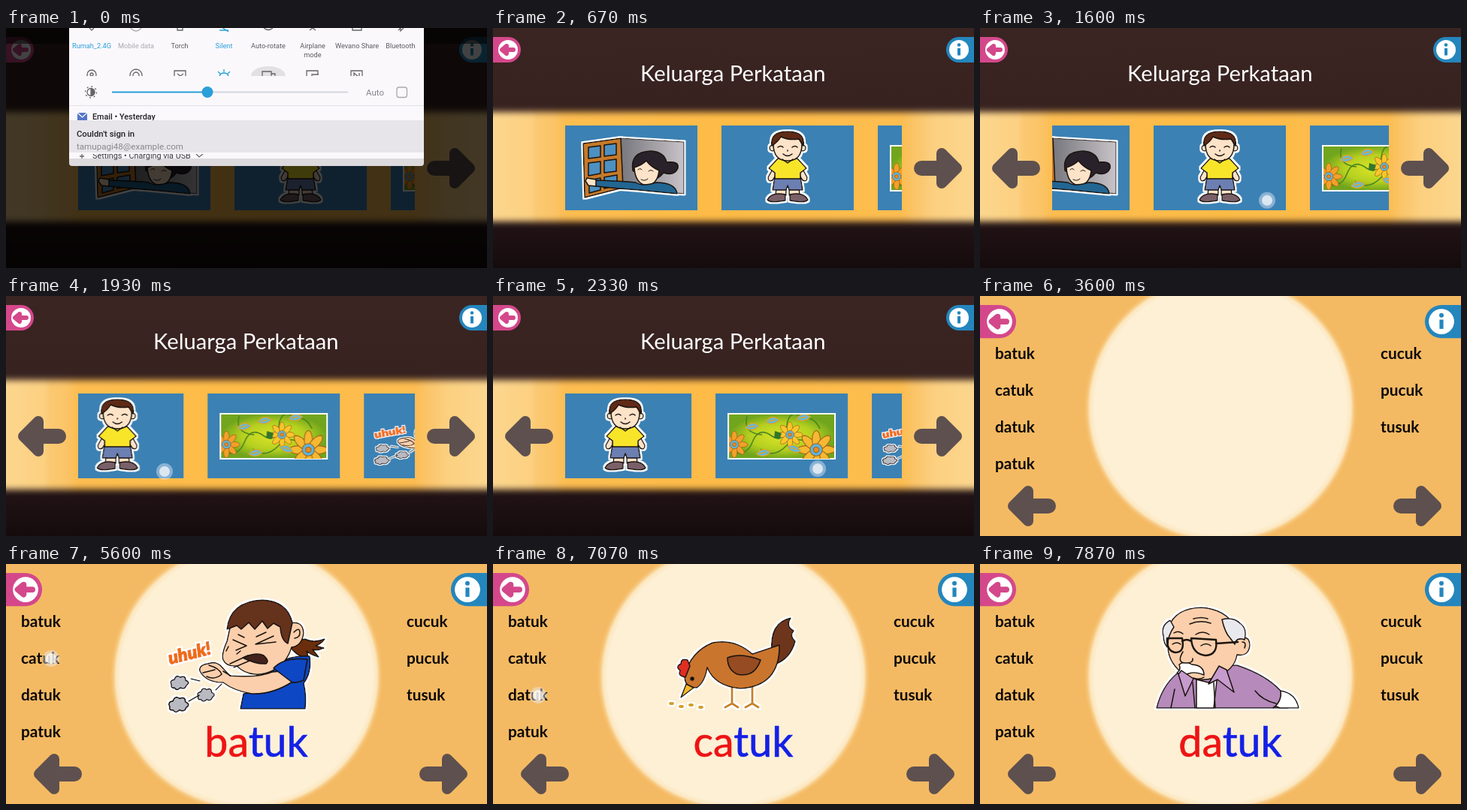
An HTML page for the animation above (8 s loop, 640 px wide and 320 px high).

```html
<!DOCTYPE html>
<html lang="ms">
<head>
<meta charset="utf-8">
<title>Keluarga Perkataan</title>
<style>
html, body { margin: 0; width: 100%; height: 100%; overflow: hidden; background: #1a0e0f; }
svg.stage { display: block; width: 100%; height: 100%; }
.title, .word, .list { font-family: Lato, sans-serif; }
.title { font-size: 29.2px; fill: #fff; }
.list { font-size: 20.8px; font-weight: 700; fill: #0b0808; }
.word { font-size: 55.5px; text-anchor: middle; fill: #1420e6; stroke: #1420e6; stroke-width: .6; }
.word .onset { fill: #ee1414; stroke: #ee1414; }
.ui { font-family: Roboto, sans-serif; }
.tiles { font-size: 9.2px; text-anchor: middle; fill: #5a5a5e; }
.on { fill: #2a9fd8; }
.off { fill: #aaa9ae; }
.line { fill: none; stroke: #666; stroke-width: 1.3; }
.ink { stroke: #1a1210; stroke-width: 1.5; stroke-linejoin: round; stroke-linecap: round; }
.bare { fill: none; }
.skin { fill: #fccfac; }
.pale { fill: #fde3c8; }
.arrow { fill: #5e504f; stroke: #5e504f; stroke-linejoin: round; stroke-linecap: round; }

/* 1% of the loop is 80 ms */
.anim { animation: 8s linear infinite both; }
.shade { animation-name: shade; }
.dim { animation-name: dim; }
.strip { animation-name: strip; }
.prev { animation-name: prev; }
.detail { animation-name: detail; }
.cough { animation-name: cough; }
.peck { animation-name: peck; }
.elder { animation-name: elder; }
.drag1 { animation-name: drag1; }
.drag2 { animation-name: drag2; }
.tap1 { animation-name: tap1; }
.tap2 { animation-name: tap2; }
.tap3 { animation-name: tap3; }
.tap4 { animation-name: tap4; }
@keyframes shade {
  0%, .875% { transform: none; animation-timing-function: ease-out; }
  6.5%, 100% { transform: translateY(-192px); }
}
@keyframes dim { 0%, .875% { opacity: 1; } 8.3%, 100% { opacity: 0; } }
@keyframes strip {
  0%, 17.5% { transform: none; animation-timing-function: ease-in-out; }
  24.125% { transform: translateX(-244px); animation-timing-function: ease-out; }
  27.5%, 28.4% { transform: translateX(-208px); animation-timing-function: ease-in; }
  32% { transform: translateX(-330px); animation-timing-function: ease-out; }
  35.875% { transform: translateX(-406px); animation-timing-function: ease-out; }
  38.3%, 100% { transform: translateX(-416px); }
}
@keyframes prev { 0%, 18.5% { opacity: 0; } 20%, 100% { opacity: 1; } }
@keyframes detail { 0%, 40.6% { opacity: 0; } 45%, 100% { opacity: 1; } }
@keyframes cough { 0%, 53% { opacity: 0; } 58.3%, 72% { opacity: 1; } 77.4%, 100% { opacity: 0; } }
@keyframes peck { 0%, 72% { opacity: 0; } 77.4%, 91% { opacity: 1; } 96.5%, 100% { opacity: 0; } }
@keyframes elder { 0%, 91% { opacity: 0; } 96.5%, 100% { opacity: 1; } }
@keyframes drag1 {
  0%, 17.45% { opacity: 0; transform: translate(455px, 228px); }
  17.5% { opacity: 1; transform: translate(455px, 228px); animation-timing-function: ease-in-out; }
  24.125% { opacity: 1; transform: translate(211px, 234px); }
  26%, 100% { opacity: 0; transform: translate(211px, 234px); }
}
@keyframes drag2 {
  0%, 28.35% { opacity: 0; transform: translate(440px, 230px); }
  28.4% { opacity: 1; transform: translate(440px, 230px); animation-timing-function: ease-in; }
  32% { opacity: 1; transform: translate(318px, 234px); }
  34.5%, 100% { opacity: 0; transform: translate(270px, 234px); }
}
@keyframes tap1 { 0%, 39.1% { opacity: 0; } 39.15%, 40.5% { opacity: 1; } 42.5%, 100% { opacity: 0; } }
@keyframes tap2 { 0%, 50.8% { opacity: 0; } 50.85%, 52% { opacity: 1; } 54%, 100% { opacity: 0; } }
@keyframes tap3 { 0%, 69.95% { opacity: 0; } 70%, 71% { opacity: 1; } 73%, 100% { opacity: 0; } }
@keyframes tap4 { 0%, 88.3% { opacity: 0; } 88.35%, 90% { opacity: 1; } 92%, 100% { opacity: 0; } }
</style>
</head>
<body>
<svg class="stage" viewBox="0 0 640 320" preserveAspectRatio="none">
<defs>
  <linearGradient id="night" x2="0" y2="1">
    <stop stop-color="#3a2523"/><stop offset=".35" stop-color="#372220"/>
    <stop offset=".8" stop-color="#231416"/><stop offset="1" stop-color="#150b0d"/>
  </linearGradient>
  <linearGradient id="gold">
    <stop stop-color="#fcd68e"/><stop offset=".08" stop-color="#fcd081"/>
    <stop offset=".09" stop-color="#fbc972"/><stop offset=".125" stop-color="#fbc468"/>
    <stop offset=".15" stop-color="#fdbd51"/><stop offset=".5" stop-color="#febb45"/>
    <stop offset=".85" stop-color="#fdbd51"/><stop offset=".875" stop-color="#fbc468"/>
    <stop offset=".92" stop-color="#fcd081"/><stop offset="1" stop-color="#fcd68e"/>
  </linearGradient>
  <radialGradient id="moon">
    <stop offset=".92" stop-color="#fdf0d5"/><stop offset=".955" stop-color="#fce6bd"/>
    <stop offset="1" stop-color="#f6bd67" stop-opacity="0"/>
  </radialGradient>
  <radialGradient id="lime">
    <stop stop-color="#dde428"/><stop offset=".6" stop-color="#b5d020"/><stop offset="1" stop-color="#71a51d"/>
  </radialGradient>
  <linearGradient id="wall"><stop stop-color="#77777d"/><stop offset="1" stop-color="#c8c3c8"/></linearGradient>
  <filter id="soft" x="-5%" y="-15%" width="110%" height="130%"><feGaussianBlur stdDeviation="0 4"/></filter>
  <filter id="sticker" x="-10%" y="-10%" width="120%" height="120%">
    <feMorphology in="SourceAlpha" operator="dilate" radius="2" result="fat"/>
    <feFlood flood-color="#fff"/><feComposite in2="fat" operator="in"/>
    <feMerge><feMergeNode/><feMergeNode in="SourceGraphic"/></feMerge>
  </filter>
  <clipPath id="window"><path d="M96 130h448v113H96z"/></clipPath>
  <clipPath id="cloth"><path d="M18 158h140v59H18z"/></clipPath>
  <clipPath id="tileArea"><path d="M84 0h472v64H84z"/></clipPath>

  <g id="next" class="arrow">
    <path d="M-22 0H4" stroke-width="20"/>
    <path d="M5 -20L25 0 5 20z" stroke-width="14"/>
  </g>
  <g id="touch">
    <circle r="11" fill="#e8eefa" opacity=".45"/>
    <circle r="7" fill="#fff" opacity=".7"/>
  </g>
  <g id="back">
    <path d="M0 0H20a17 17 0 0 1 0 34H0z" fill="#d4488b"/>
    <circle cx="20" cy="17" r="13" fill="#fff"/>
    <path d="M18 12L12 17l6 5zM17 17h10" fill="#d4488b" stroke="#d4488b" stroke-width="6" stroke-linejoin="round" stroke-linecap="round"/>
  </g>
  <g id="info">
    <path d="M0 0H-20a17 17 0 0 0 0 34H0z" fill="#2486bd"/>
    <circle cx="-20" cy="17" r="13" fill="#fff"/>
    <circle cx="-20" cy="10.5" r="2.3" fill="#2486bd"/>
    <path d="M-20 15v9.500" stroke="#2486bd" stroke-width="4"/>
  </g>
  <path id="card" d="M0 130h176v113H0z" fill="#3b81b4"/>
  <g id="petals"><ellipse cx="9" rx="8" ry="3.6"/><ellipse cx="-9" rx="8" ry="3.6"/></g>
  <g id="bloom" stroke="#a0641a" stroke-width=".7">
    <use href="#petals"/><use href="#petals" transform="rotate(45)"/>
    <use href="#petals" transform="rotate(90)"/><use href="#petals" transform="rotate(135)"/>
    <circle r="5.5" fill="#5fb4dc"/><circle r="2.4" fill="#ef8a1d"/>
  </g>
  <path id="leaf" d="M0 0Q7 -11 18 -3Q10 6 0 0zM4 -1L13 -3" fill="#62b9dd" stroke="#e2a522" stroke-width="1.3"/>
  <path id="puff" class="ink" d="M-12 3q-3 -6 4 -7q2 -7 8 -3q7 -3 7 4q7 3 1 7q-2 6 -8 3q-5 5 -8 0q-5 1 -4 -4z" fill="#b9b9c2"/>

  <g id="coughArt" filter="url(#sticker)">
    <path class="ink" d="M374 92q10 12 24 8q11 6 26 0q-5 7 -12 9l11 3q-9 4 -15 2l8 10q-11 -3 -16 -8l3 11q-16 -3 -27 -19z" fill="#6b2e10"/>
    <path class="ink" d="M312 193l4 -20q20 -2 40 -13l-5 -19q20 -20 53 -18q3 22 -8 36q4 16 2 34z" fill="#0d46c4"/>
    <path class="ink skin" d="M300 77q-3 12 -6 26q-8 18 -5 25q4 9 18 8q10 10 24 11q13 1 24 -5q19 -10 25 -31q14 -2 16 -19q-1 -17 -18 -13l-18 -11z"/>
    <path class="ink" d="M294 87q4 -37 47 -39q33 1 40 30l-6 28q-9 -4 -10 -22l-9 -5l-8 7l-7 -10l-10 11l-8 -9l-10 9l-6 -5z" fill="#65301c"/>
    <path class="ink bare" d="M383 91q8 -8 8 1q0 6 -7 7"/>
    <path class="ink bare" d="M302 101l18 8l-14 6M356 96l-24 11l27 -3M309 94l8 4M333 97l13 -6M312 116l-5 4M296 110l-3 6" stroke-width="1"/>
    <path class="ink" d="M315 125q18 -8 28 -3q8 7 3 11q-13 1 -31 -8z" fill="#43201c"/>
    <path class="ink skin" d="M258 143q-2 -8 10 -10q10 -4 17 2l13 14q37 3 56 -5l23 -2l4 15q-26 17 -54 16q-24 -4 -38 -15q-23 0 -31 -15z"/>
    <path class="ink" d="M356 139l25 19q9 0 15 -3l5 -28q-32 -3 -45 12z" fill="#0d46c4"/>
    <path class="ink bare" d="M270 135q14 4 17 12q-9 8 -20 3M262 145l16 -4M289 143l10 6M298 133l24 -11M303 138l21 -9"/>
    <use href="#puff" x="232" y="158"/><use href="#puff" transform="translate(231 187) scale(1.1)"/><use href="#puff" transform="translate(267 174) scale(.95)"/>
    <path class="ink bare" d="M246 153l12 3M243 183l14 -8M279 168l8 -8"/>
    <text transform="translate(218 134) rotate(-14)" font-family="Lato, sans-serif" font-size="23.5" font-weight="900" font-style="italic" fill="#f06c10" stroke="#f06c10" stroke-width="1">uhuk!</text>
  </g>
</defs>

<g>
  <path d="M0 0h640v320H0z" fill="url(#night)"/>
  <path d="M0 112h640v146H0z" fill="url(#gold)" filter="url(#soft)"/>
  <text class="title" x="196" y="71">Keluarga Perkataan</text>
  <use href="#back" y="12"/><use href="#info" x="640" y="12"/>

  <g clip-path="url(#window)"><g class="anim strip">
    <g transform="translate(96)">
      <use href="#card"/>
      <g class="ink" filter="url(#sticker)">
        <path d="M74 147l84 5v69l-81 -8z" fill="url(#wall)" stroke-width="1"/>
        <path d="M24 154l50 -7l3 66l-51 13z" fill="#c57a2a"/>
        <path d="M31 159l16 -2v15l-16 2zM52 156l16 -2v15l-16 2zM31 180l16 -2v16l-16 3zM52 177l16 -2v16l-16 2zM32 203l15 -3v16l-15 4zM52 199l17 -3v14l-17 4z" fill="#4e90c2"/>
        <path d="M90 190q-4 -25 24 -26q18 1 21 15q17 -2 15 8q-5 11 -19 6q-9 11 -21 10z" fill="#292429"/>
        <path class="pale" d="M92 186q10 -3 16 -9q7 9 17 13q-2 19 -17 20q-15 -3 -16 -24z"/>
        <path d="M94 206q9 6 27 0q26 0 28 15l-52 -5q-28 -2 -56 -5l-1 -8q36 1 54 3z" fill="#216692"/>
        <path class="pale" d="M41 202l-12 -2l-2 4l4 6l10 1z"/>
        <path class="bare" d="M97 189q3 -3 5 0M111 191q3 -3 6 0M101 202q5 3 9 -1" stroke-width="1"/>
      </g>
    </g>
    <g transform="translate(304)">
      <use href="#card"/>
      <g class="ink" filter="url(#sticker)" stroke-width="1">
        <path class="pale" d="M72 181l-10 18q0 7 6 4l8 -12zM104 181l10 18q0 7 -6 4l-8 -12zM73 211h13v12H72zM90 211h13l1 12H90z"/>
        <path d="M61 229q5 -11 24 -7v8q-21 4 -24 -1zM115 229q-5 -11 -24 -7v8q21 4 24 -1z" fill="#7a6068"/>
        <path d="M71 198h34l3 18H90l-2 -6l-2 6H68z" fill="#6c7fb2"/>
        <path d="M75 174h26l12 13l-8 6v8H71v-8l-8 -6z" fill="#f8e52a"/>
        <circle class="pale" cx="68" cy="160" r="4"/><circle class="pale" cx="108" cy="160" r="4"/>
        <path class="pale" d="M69 155q0 22 19 22t19 -22q-4 -13 -19 -13t-19 13z"/>
        <path d="M67 157q-3 -19 21 -19t21 19l-6 -9q-14 2 -24 -3q-4 7 -12 12z" fill="#5e2b14"/>
        <path class="bare" d="M75 159q4 -3 7 0M94 159q4 -3 7 0M82 168q6 5 12 0M88 163v1M81 175l7 5l7 -5"/>
      </g>
    </g>
    <g transform="translate(512)">
      <use href="#card"/>
      <path d="M17 157h142v60H17z" fill="url(#lime)" stroke="#fff" stroke-width="2"/>
      <g clip-path="url(#cloth)">
        <path d="M18 207q23 9 31 -12t25 -9t21 -14t26 -6M60 204q17 14 35 -5t40 10M42 160q-6 23 20 25M113 164q17 -6 26 13" class="bare" stroke="#4d861e" stroke-width="1.6"/>
        <use href="#bloom" transform="translate(25 198) scale(1.05)" fill="#f3a02a"/>
        <use href="#bloom" transform="translate(99 185)" fill="#f9c62c"/>
        <use href="#bloom" transform="translate(134 205) scale(1.5)" fill="#f6b832"/>
        <use href="#leaf" x="40" y="176"/><use href="#leaf" x="67" y="168"/><use href="#leaf" x="55" y="211"/>
        <use href="#leaf" x="108" y="164"/><use href="#leaf" transform="translate(96 201) rotate(30)"/>
        <path d="M79 180l9 3l-3 8l-7 -2z" fill="#34762b"/>
      </g>
    </g>
    <g transform="translate(720)">
      <use href="#card"/>
      <use href="#coughArt" transform="matrix(.7476 0 0 .55 -147.7 116.1)"/>
    </g>
    <g transform="translate(928)">
      <use href="#card"/>
      <path class="ink" d="M40 153q-25 4 -20 23l4 10q-10 9 -6 22h50v-50z" fill="#f3e6dc" filter="url(#sticker)"/>
    </g>
  </g></g>
  <use href="#next" transform="translate(592 187)"/>
  <g class="anim prev"><use href="#next" transform="translate(48 187) scale(-1 1)"/></g>
</g>

<g class="anim detail">
  <path d="M0 0h640v320H0z" fill="#f4ba63"/>
  <circle cx="320" cy="150" r="182" fill="url(#moon)"/>
  <use href="#back" transform="translate(0 12) scale(1.3)"/>
  <use href="#info" transform="translate(640 12) scale(1.3)"/>
  <g class="list">
    <text x="20" y="83.500">batuk</text><text x="20" y="132.500">catuk</text>
    <text x="20" y="181.500">datuk</text><text x="20" y="230.500">patuk</text>
    <text x="533" y="83.500">cucuk</text><text x="533" y="132.500">pucuk</text><text x="533" y="181.500">tusuk</text>
  </g>
  <use href="#next" transform="translate(69 280) scale(-1 1)"/>
  <use href="#next" transform="translate(582 280)"/>

  <g class="anim cough">
    <use href="#coughArt"/>
    <text class="word" x="333" y="257"><tspan class="onset">ba</tspan>tuk</text>
  </g>

  <g class="anim peck">
    <g class="ink" filter="url(#sticker)">
      <path d="M318 158v28l-9 5M318 186l8 5M345 158v28l-9 5M345 186l8 5" class="bare" stroke="#c9821f" stroke-width="3"/>
      <path d="M371 116q-3 -38 25 -44q-7 11 4 17q-6 7 2 14q-6 23 -27 31z" fill="#6d351d"/>
      <path d="M381 108q1 55 -52 58q-34 -3 -44 -28q-3 20 -14 27q-17 0 -16 -17q8 -31 37 -43q30 -6 53 15z" fill="#c9742f"/>
      <path d="M312 125q17 -7 44 3q-8 24 -31 19q-13 -6 -13 -22z" fill="#964b20"/>
      <path d="M256 151q-11 -2 -7 -9q-7 -5 1 -9q0 -8 9 -5l3 8z" fill="#df2e22"/>
      <path d="M257 160l-7 18l17 -13z" fill="#f4b92b"/>
      <circle cx="265" cy="153" r="2" fill="#111"/>
      <path d="M236 186h3M249 190h3M262 188h3M275 191h3" stroke="#d5a023" stroke-width="4"/>
    </g>
    <text class="word" x="333" y="257"><tspan class="onset">ca</tspan>tuk</text>
  </g>

  <g class="anim elder">
    <g class="ink" filter="url(#sticker)">
      <path d="M235 192q7 -29 27 -46q23 -12 54 -11l26 0q39 13 58 34l10 23z" fill="#b68abb"/>
      <path d="M288 154l16 4l12 -11l-5 45h-23z" fill="#fff"/>
      <path d="M400 169q20 3 24 23h-25q-7 -4 -9 0q12 -9 10 -23z" fill="#fff"/>
      <path class="skin" d="M251 84q9 -25 43 -26q34 2 46 27l5 15q14 -6 14 9q-2 15 -17 12q-3 21 -31 31q-25 7 -44 -8q-17 -15 -17 -34z"/>
      <path d="M322 74q15 -4 24 5q10 7 6 22q-11 -4 -13 6l-6 -8q-7 -7 -11 -25zM253 75q-13 7 -9 21q0 9 5 15q1 -16 9 -27z" fill="#e9e8ec"/>
      <path d="M265 134q8 -6 17 0q16 1 16 14q-12 -5 -20 -2q-10 3 -16 -1q6 -4 3 -11z" fill="#fff"/>
      <path d="M270 117q-9 15 4 15q10 0 9 -6" class="skin"/>
      <path class="bare" d="M279 80q14 -6 28 -1M284 73q11 -3 19 0M258 92q6 -4 12 1M287 94q9 -6 18 0M256 107q6 -4 11 0M294 109q7 -5 13 0M284 152q8 3 14 -1M349 104q6 0 3 8"/>
      <path class="bare" d="M249 99h20q4 19 -9 19q-12 -2 -11 -19zM281 99l33 2q3 20 -14 21q-18 -2 -19 -23zM269 103q6 -4 12 0M314 106l29 -2" stroke-width="2.4"/>
      <path d="M264 147l4 -5l16 11l-11 23zM318 136l10 5l10 30l-22 -17l-12 6z" fill="#c79bcd"/>
      <path class="bare" d="M259 167l-5 25M311 158l2 34M283 158l3 34M366 169q10 13 28 17"/>
    </g>
    <text class="word" x="333" y="257"><tspan class="onset">da</tspan>tuk</text>
  </g>
</g>

<g class="anim drag1"><use href="#touch"/></g>
<g class="anim drag2"><use href="#touch"/></g>
<g class="anim tap1"><use href="#touch" x="395" y="190"/></g>
<g class="anim tap2"><use href="#touch" x="48" y="77"/></g>
<g class="anim tap3"><use href="#touch" x="60" y="126"/></g>
<g class="anim tap4"><use href="#touch" x="60" y="175"/></g>

<g class="anim dim">
  <path d="M0 0h640v320H0z" opacity=".74"/>
  <path d="M0 0h640v21H0z" opacity=".55"/>
</g>
<g class="anim shade ui">
  <path d="M84 0h472v180q0 4 -4 4H88q-4 0 -4 -4z" fill="#dddade"/>
  <path d="M84 0h472v174H84z" fill="#fbf8fc"/>
  <g clip-path="url(#tileArea)">
    <ellipse cx="349" cy="64" rx="23" ry="13" fill="#e3e0e4"/>
    <g class="line">
      <path d="M111 0l3 3l3 -3M228 -2v5h7v-5M343 0q6 5 12 0M404 3l4 -3l4 3M461 -2v5h12v-5M522 3l3 -3v4l4 -4"/>
      <circle cx="173" cy="-4" r="8" stroke="#aaa"/>
      <path d="M284 3h12M284 -3l12 8" stroke="#2a9fd8"/>
      <circle cx="114" cy="62" r="6"/><circle cx="114" cy="62" r="2"/>
      <circle cx="173" cy="63" r="8"/><circle cx="173" cy="63" r="4"/>
      <path d="M224 70V57h15v13M228 61l4 3l4 -3M341 70V58h12v12M353 61h5v9M400 66v-9h15v5M407 66v-4h9M459 70V57h15v13M463 66v-6l7 6v-6"/>
      <path d="M284 66q0 -6 6 -6t6 6M290 55v4M282 58l3 3M298 58l-3 3" stroke="#2a9fd8"/>
    </g>
  </g>
  <g class="tiles">
    <text class="on" x="114" y="27">Rumah_2.4G</text><text class="off" x="173" y="27">Mobile data</text>
    <text x="231" y="27">Torch</text><text class="on" x="290" y="27">Silent</text>
    <text x="349" y="27">Auto-rotate</text><text x="408" y="27">Airplane</text><text x="408" y="39">mode</text>
    <text x="467" y="27">Wevano Share</text><text x="525" y="27">Bluetooth</text>
  </g>
  <g class="line">
    <circle cx="113" cy="85.5" r="5"/><circle cx="113" cy="85.5" r="7.5" stroke-dasharray="2 3.9"/>
    <path d="M113 81a4.5 4.5 0 0 1 0 9z" fill="#666"/>
    <path d="M268 85.5h187" stroke="#d3d6dc" stroke-width="2"/>
    <path d="M141 85.5h127" stroke="#2a9fd8" stroke-width="2"/>
    <rect x="520" y="79" width="13.5" height="13.5" rx="3" stroke="#aaa"/>
  </g>
  <circle class="on" cx="268" cy="85.5" r="7.5"/>
  <text x="479" y="90" font-size="11.5" fill="#85838a">Auto</text>
  <path d="M84 103.500h472" stroke="#e4e1e6"/>
  <path d="M95 113h13v10H95z" fill="#5477c6"/><path d="M95 113l6.500 6l6.500 -6" class="bare" stroke="#fff" stroke-width="1.2"/>
  <text x="115" y="122" font-size="10.800" font-weight="500" fill="#242226">Email • Yesterday</text>
  <text x="115" y="173.500" font-size="10.800" fill="#3a383c">Settings • Charging via USB</text>
  <path class="line" d="M253 168l4 4l5 -4M101 166v8M98 171h6"/>
  <path d="M84 123h472v45H84z" fill="#e8e5ea"/>
  <path d="M84 166h472v2H84z" fill="#fbf8fc"/>
  <text x="94" y="145" font-size="11.300" font-weight="500" fill="#242226">Couldn't sign in</text>
  <text x="94" y="162" font-size="11.600" fill="#89868d">tamupagi48@example.com</text>
</g>
</svg>
</body>
</html>
```
